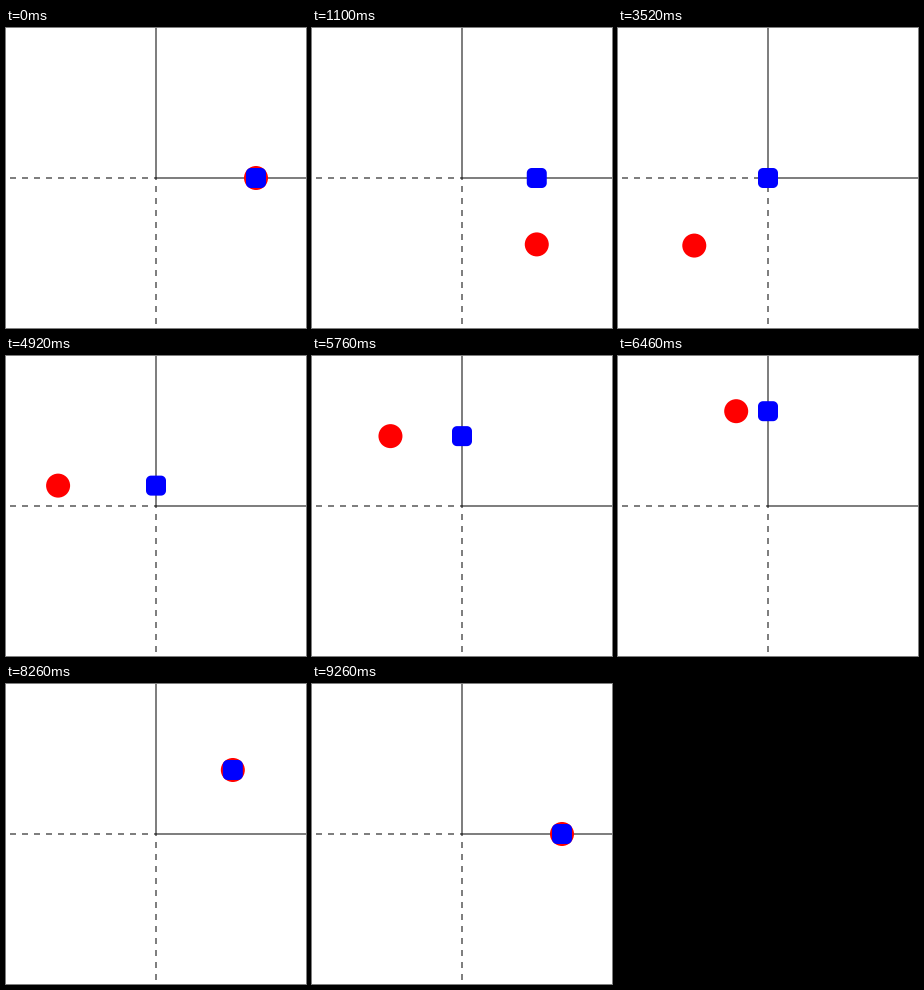
A matplotlib script that plays this animation: 300x300 px, repeating every 9.28 s.

```python
import numpy as np
import matplotlib.pyplot as plt
from matplotlib.animation import FuncAnimation
from matplotlib.patches import Circle, Polygon

SIZE, DPI = 300, 100
MID = SIZE / 2
ORBIT = 100
STEPS = 200
TICK, LOOP = 20, 9280
PX = 72 / DPI

fig = plt.figure(figsize=(SIZE / DPI, SIZE / DPI), dpi=DPI, facecolor="white")
ax = fig.add_axes([0, 0, 1, 1])
ax.set_xlim(0, SIZE)
ax.set_ylim(SIZE, 0)
ax.axis("off")


def axis_line(xs, ys, style="-"):
    ax.plot(xs, ys, color="black", lw=PX, ls=style, snap=False,
            solid_capstyle="butt", dash_capstyle="butt", zorder=1)


def rounded_square(half, radius, n=12):
    """Outline of a square with circular corners, centred on the origin."""
    quarter = np.linspace(0, np.pi / 2, n)
    points = []
    for k, (sx, sy) in enumerate([(1, 1), (-1, 1), (-1, -1), (1, -1)]):
        a = quarter + k * np.pi / 2
        corner = (half - radius) * np.array([sx, sy])
        points.append(corner + radius * np.column_stack([np.cos(a), np.sin(a)]))
    return np.vstack(points)


# Borders of the positive quadrant are solid, the negative half-axes dashed.
dashed = (0, (6, 6))
axis_line([MID, SIZE], [MID, MID])
axis_line([MID, MID], [0, MID])
axis_line([4, MID], [MID, MID], dashed)
axis_line([MID, MID], [SIZE - 4, MID], dashed)

square = rounded_square(10, 5)
point = ax.add_patch(Circle((MID + ORBIT, MID), 12, fc="red", lw=0, zorder=2))
shadow = ax.add_patch(Polygon(square + MID, closed=True, fc="blue", lw=0, zorder=3))


def step_at(ms):
    """Poses are held for 20, 100 and 20 ms in turn."""
    group, rest = divmod(ms, 140)
    return 3 * group + (rest >= 20) + (rest >= 120)


def update(tick):
    angle = 2 * np.pi * step_at(tick * TICK) / (STEPS - 1)
    x, y = ORBIT * np.cos(angle), ORBIT * np.sin(angle)
    point.center = MID + x, MID + y
    # Nearest place inside the quadrant to the right of and above the middle.
    shadow.set_xy(square + [MID + max(x, 0), MID + min(y, 0)])
    return point, shadow


anim = FuncAnimation(fig, update, frames=LOOP // TICK, interval=TICK,
                     repeat=True, repeat_delay=0, blit=False)
plt.show()
```
